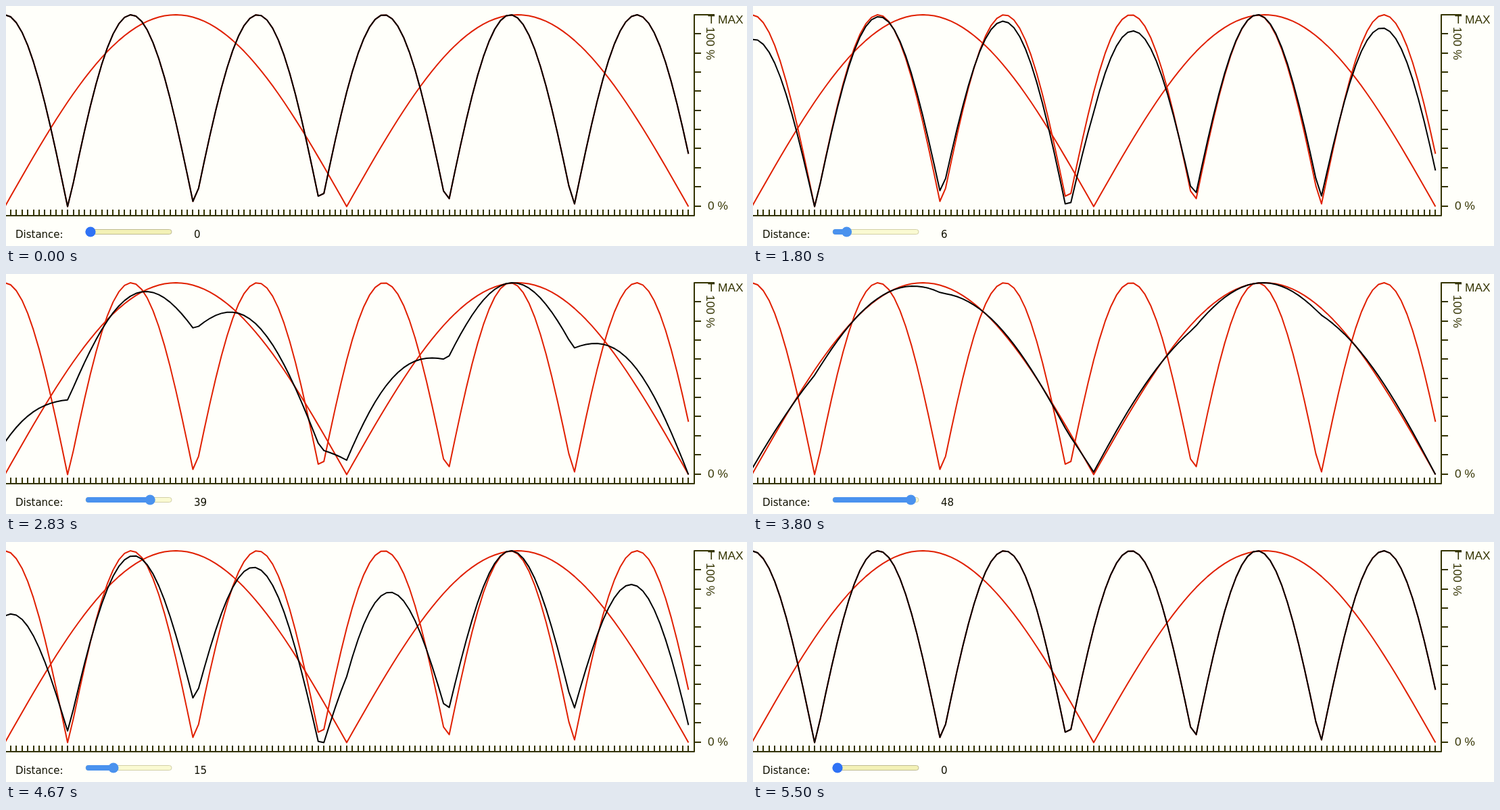
Recreate the animation shown at these times as an HTML page. Size 1096 by 356 pixels, loop 7160 ms.

```html
<!DOCTYPE html>
<html lang="en">
<head>
<meta charset="utf-8">
<title>Distance slider</title>
<style>
  html, body { margin: 0; width: 100%; height: 100%; overflow: hidden; background: #fffffa; }
  svg { display: block; }
  path { fill: none; stroke-width: 2; stroke-linejoin: round; }
  .axis { stroke: #333300; }
  .base { stroke: #e02000; }
  .mix { stroke: #000; }
  .scale { font: 17.3px "Liberation Sans", Arial, sans-serif; fill: #333300; }
  .label { font: 15px "DejaVu Sans", Verdana, sans-serif; fill: #111100; }
</style>
</head>
<body>
<svg width="1096" height="356" viewBox="0 0 1096 356">
  <path class="axis" id="axis"/>
  <path class="base" id="slow"/>
  <path class="base" id="fast"/>
  <path class="mix" id="mix"/>
  <g class="scale">
    <text x="1038" y="26">T MAX</text>
    <text transform="translate(1036 31) rotate(90)">100 %</text>
    <text x="1038" y="302">0 %</text>
  </g>
  <g class="label">
    <text x="14" y="344">Distance:</text>
    <text x="278" y="344" id="value">0</text>
  </g>
  <rect id="track" x="118" y="331.5" width="127" height="7" rx="3.5"/>
  <rect id="fill" x="118" y="331" height="8" rx="4"/>
  <circle id="thumb" cy="335" r="7.6"/>
</svg>
<script>
const LOOP = 7160, COUNT = 121, MAX = 50;
const $ = id => document.getElementById(id);
const px = i => 8.425 * i - 1.6;
const samples = f => Array.from({ length: COUNT }, (_, i) => f(i));

const slow = samples(i => Math.abs(Math.sin(Math.PI * i / 60)));
const fast = samples(i => Math.abs(Math.sin(Math.PI * (i - 11.07) / 22.19)));

// Curves are always stretched to the full 0-100 % range.
function curve(values) {
  const low = Math.min(...values), span = Math.max(...values) - low;
  return 'M' + values.map((v, i) =>
    px(i).toFixed(2) + ' ' + (297.5 - 284.5 * (v - low) / span).toFixed(2)).join('L');
}

function axis() {
  let d = 'M0 311H1018V13H1048';
  for (let i = 1; i < COUNT; i++) d += `M${Math.round(px(i))} 302V311`;
  for (let i = 1; i <= 10; i++) d += `M1018 ${Math.round(12.7 + 28.4 * i)}h10`;
  return d;
}

// Slider drag: [time, distance]
const drag = [[1400, 0.5], [1800, 6], [2070, 14], [2130, 16], [2230, 19], [2830, 39],
  [2870, 41], [3200, 50], [3799, 50], [3800, 48], [4500, 22], [4600, 18.5],
  [4670, 15], [5000, 0]];

function distance(t) {
  if (t < drag[0][0]) return 0;
  const k = drag.findIndex(p => p[0] > t);
  if (k < 0) return 0;
  const [t0, d0] = drag[k - 1], [t1, d1] = drag[k];
  return Math.round(d0 + (d1 - d0) * (t - t0) / (t1 - t0));
}

// Slider colours: accent, track, track border
const idle = ['#2f72f5', '#f3f1b6', '#bfbb94'];
const hover = ['#1f5fd0', '#ebe9ae', '#b0ac88'];
const active = ['#4a92ee', '#fafad2', '#d2d0a8'];

function colours(t) {
  if (t < 500 || t >= 5500) return idle;
  return t < 930 || t >= 5270 ? hover : active;
}

function set(id, attrs) {
  for (const name in attrs) $(id).setAttribute(name, attrs[name]);
}

function draw(now) {
  const t = now % LOOP, d = distance(t), w = d / MAX;
  const [accent, track, border] = colours(t);
  const x = 125 + 2.26 * d;
  set('mix', { d: curve(fast.map((v, i) => v * (1 - w) + slow[i] * w)) });
  set('track', { fill: track, stroke: border });
  set('fill', { fill: accent, width: x - 118 });
  set('thumb', { fill: accent, cx: x });
  $('value').textContent = d;
  requestAnimationFrame(draw);
}

set('axis', { d: axis() });
set('slow', { d: curve(slow) });
set('fast', { d: curve(fast) });
draw(0);
</script>
</body>
</html>
```
